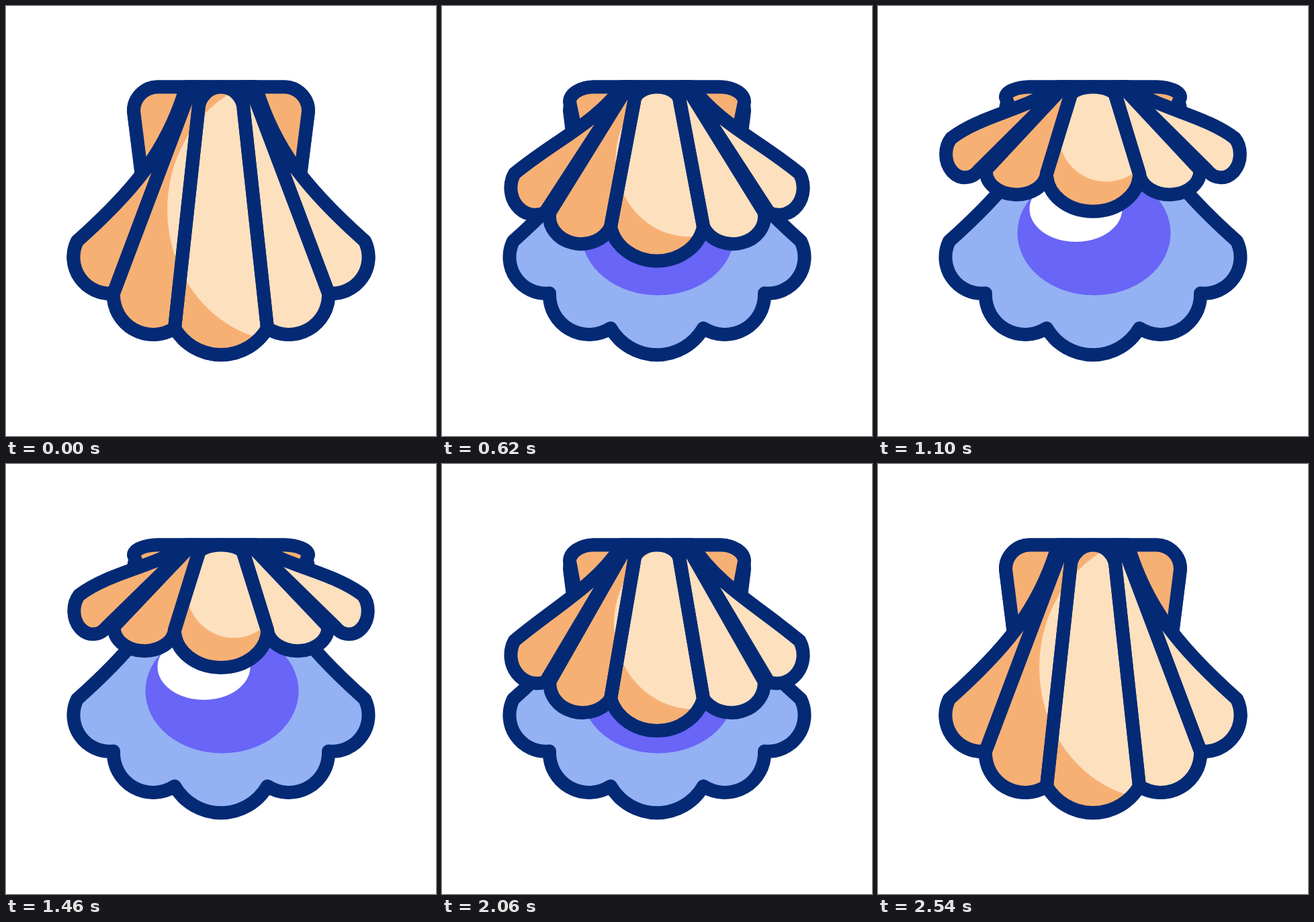
Write an HTML page that moves like this. It is 640x640 px and loops after 3.6 s.

```html
<!DOCTYPE html>
<html lang="en">
<head>
<meta charset="utf-8">
<title>Shell</title>
<style>
  html, body { margin: 0; width: 100%; height: 100%; overflow: hidden; background: #fff; }
  svg { display: block; width: 100%; height: 100%; }
  .line { stroke: #042a75; stroke-width: 20; stroke-linecap: round; stroke-linejoin: round; }
  .flip { transform: translate(640px, 0) scale(-1, 1); }
  .dark { fill: #f7b074; }
  .pale { fill: #fde0be; }
</style>
</head>
<body>
<svg viewBox="0 0 640 640">
  <defs>
    <clipPath id="lit"><path data-part="inner"/><path data-part="middle"/></clipPath>
  </defs>
  <g class="line" fill="#94b1f3">
    <path data-still="hinge"/>
    <path data-still="half"/>
    <path data-still="half" class="flip"/>
  </g>
  <ellipse cx="321.5" cy="338" rx="114" ry="92.5" fill="#6865f7"/>
  <ellipse cx="294.5" cy="302" rx="69" ry="49" fill="#fff"/>
  <path data-part="hinge" class="line dark"/>
  <g class="dark"><path data-part="outer"/><path data-part="inner"/></g>
  <g class="pale flip"><path data-part="outer"/><path data-part="inner"/></g>
  <path data-part="middle" class="dark"/>
  <g clip-path="url(#lit)"><ellipse id="light" class="pale"/></g>
  <g class="line" fill="none">
    <path data-part="outer"/>
    <path data-part="inner"/>
    <g class="flip"><path data-part="outer"/><path data-part="inner"/></g>
    <path data-part="middle"/>
  </g>
</svg>
<script>
const LOOP = 3600, PEAK = 1315, HALF = 1205, REACH = 1.0225;
const TOP = 120.5;

// Key points and radii of the left half: [shut, open].
const keys = {
  corner:   [[36], [15.5]],
  foot:     [[202, 252], [199, 160]],
  bendTop:  [[240, 215], [222, 154]],
  bendLow:  [[190, 275], [155, 162]],
  shoulder: [[106, 350], [109, 197]],
  lobe1:    [[54, 54], [27, 33]],
  notch:    [[160, 427.5], [150, 245]],
  rib:      [[160, 427.5], [161, 244]],
  lobe2:    [[59, 59], [41, 31]],
  base:     [[251, 479.5], [251, 250]],
  lobe3:    [[80, 80], [65, 53]],
  glow:     [[420, 303], [340, 188]],
  glowSize: [[180, 197], [72, 74]]
};

function poseAt(k) {
  const pose = {};
  for (const name in keys) {
    const [shut, open] = keys[name];
    pose[name] = shut.map((v, i) => v + (open[i] - v) * k);
  }
  return pose;
}

const flip = ([x, y]) => [640 - x, y];
const arc = (radii, end, sweep = 0) => `A${radii} 0 0 ${sweep} ${end}`;

function partsOf(p) {
  const r = p.corner[0], low = TOP + r;
  const side = `H268C${p.bendTop} ${p.bendLow} ${p.shoulder}` + arc(p.lobe1, p.notch);
  return {
    hinge: `M${p.foot}L190 ${low}` + arc([36, r], [226, TOP], 1) +
      'H414' + arc([36, r], [450, low], 1) + `L${flip(p.foot)}`,
    outer: `M268 ${TOP}${side}L275 ${TOP}Z`,
    inner: `M276 ${TOP}L${p.rib}` + arc(p.lobe2, p.base) + `L290 ${TOP}Z`,
    middle: `M${p.base}L286 ${low}` + arc([34, r], [354, low], 1) +
      `L${flip(p.base)}` + arc(p.lobe3, p.base, 1) + 'Z',
    half: `M320 ${TOP}${side}` + arc(p.lobe2, p.base) + arc(p.lobe3, [320, 519.3])
  };
}

// Easing curve with handles at (0.4, 0) and (0.22, 1).
const bez = (a, b, s) => 3 * (1 - s) * (1 - s) * s * a + 3 * (1 - s) * s * s * b + s * s * s;

function ease(u) {
  let lo = 0, hi = 1;
  for (let i = 0; i < 30; i++) {
    const s = (lo + hi) / 2;
    if (bez(0.4, 0.22, s) < u) lo = s; else hi = s;
  }
  return bez(0, 1, lo);
}

const moving = document.querySelectorAll('[data-part]');
const light = document.getElementById('light');

function draw(time) {
  const u = Math.max(0, 1 - Math.abs(time % LOOP - PEAK) / HALF);
  const pose = poseAt(ease(u) * REACH);
  const parts = partsOf(pose);
  for (const path of moving) path.setAttribute('d', parts[path.dataset.part]);
  ['cx', 'cy', 'rx', 'ry'].forEach((name, i) =>
    light.setAttribute(name, [...pose.glow, ...pose.glowSize][i]));
}

const still = partsOf(poseAt(0));
for (const path of document.querySelectorAll('[data-still]')) {
  path.setAttribute('d', still[path.dataset.still]);
}

function tick() {
  draw(performance.now());
  requestAnimationFrame(tick);
}
tick();
</script>
</body>
</html>
```
